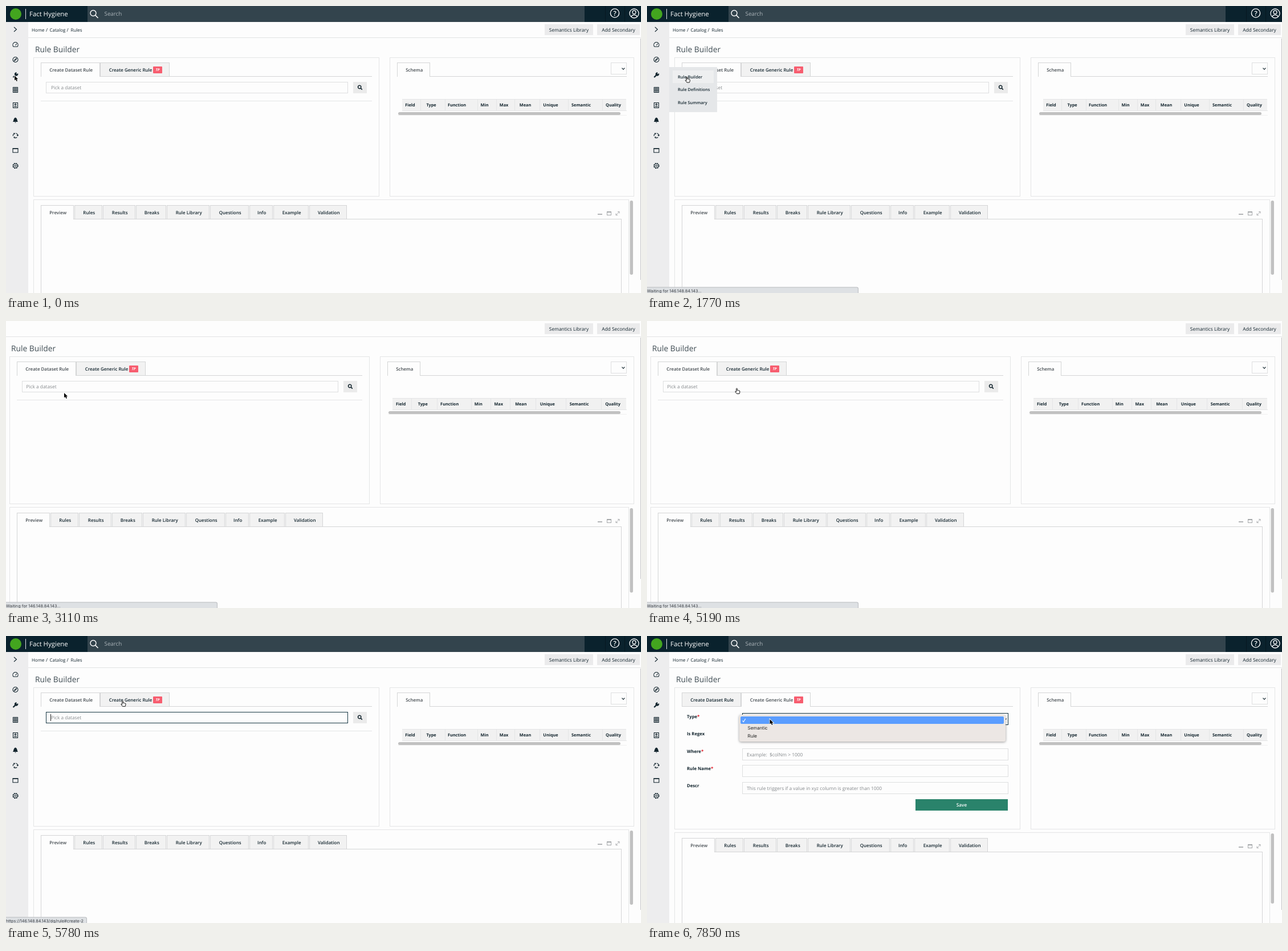
Animation of 1114 by 503 pixels, one loop 8 s. Source, as an HTML page with a canvas:

```html
<!DOCTYPE html>
<html lang="en">
<head>
<meta charset="utf-8">
<title>Rule Builder</title>
<style>
html, body { margin: 0; width: 100%; height: 100%; overflow: hidden; background: #fdfdfd; }
canvas { display: block; width: 1114px; height: 503px; }
</style>
</head>
<body>
<canvas id="stage"></canvas>
<script>
const W = 1114, H = 503, LOOP = 8000, STEP = 148.1;
const canvas = document.getElementById('stage');
const c = canvas.getContext('2d');
const ratio = window.devicePixelRatio || 1;
canvas.width = W * ratio;
canvas.height = H * ratio;
c.textRendering = 'geometricPrecision';

const SANS = '"Open Sans", "Noto Sans", sans-serif';
const UI = 'Inter, "Liberation Sans", sans-serif';
const INK = '#13252e', GREY = '#444b50', HINT = '#85898c', EDGE = '#d4d5d6', PALE = '#e4e5e6';
const FIELD = '#dedfe0', FOCUS = '#173743';
const PAGE = '#fdfdfd', TAB = '#f2f2f2', HEADER = '#0a222d', RED = '#e0202c';

const TABS = [['Preview', 61, 119], ['Rules', 120, 169], ['Results', 170, 227],
  ['Breaks', 228, 281], ['Rule Library', 282, 357], ['Questions', 358, 426],
  ['Info', 427, 468], ['Example', 469, 531], ['Validation', 532, 598]];
const COLUMNS = [['Field', 709, 727], ['Type', 746, 770], ['Function', 791, 827],
  ['Min', 839.5, 860], ['Max', 873.5, 892], ['Mean', 911, 936],
  ['Unique', 955.5, 986], ['Semantic', 1009, 1046], ['Quality', 1065.5, 1088]];

// Pointer keys: step, x, y
const KEYS = [[3, 15, 122], [9, 70, 124], [13, 70, 124], [16, 98, 125], [20, 98, 125],
  [21, 102, 126], [25, 154, 118], [32, 154, 118], [35, 157.5, 117.5], [36, 161.5, 117.5],
  [40, 219, 112], [46, 219, 112], [50, 215.5, 146]];

// Sidebar icons, drawn around (0, 0)
const ICONS = {
  41: 'M-2.5-4L2 0L-2.5 4',
  68: 'M-3.5 3.2A4.6 4.6 0 1 1 3.5 3.2ZM0 1L2.3-2',
  94: 'M4.5 0A4.5 4.5 0 1 1-4.5 0A4.5 4.5 0 1 1 4.5 0M2-2L.7 .7L-2 2L-.7-.7Z',
  147: 'M-4-4.5H4V4.5H-4ZM-4-1.5H4M-4 1.5H4M-1.3-4.5V4.5M1.3-4.5V4.5',
  174: 'M-4-4.5H4V4.5H-4ZM1.3-1.3A1.3 1.3 0 1 1-1.3-1.3A1.3 1.3 0 1 1 1.3-1.3M-2.4 2.4H2.4',
  227: 'M-4 1A4 4 0 0 1-1.8-3.6M.5-4A4 4 0 0 1 4 0M2.8 2.8A4 4 0 0 1-2.2 3.4M-3.2-4L-1.2-3.8L-1.8-1.8M2.5-1.2L4 .6L5.2-1.2M-1 1.9L-2.6 3.4L-1 4.6',
  253: 'M-4.5-3.5H4.5V3.8H-4.5ZM-4.5-2.7H4.5'
};

function text(str, x, y, size, color = INK, weight = 400, align = 'left', family = SANS) {
  c.font = `${weight} ${size}px ${family}`;
  c.textAlign = align;
  c.fillStyle = color;
  c.fillText(str, x, y + size * 0.357);
}

function fill(x, y, w, h, color, radius = 0) {
  c.fillStyle = color;
  c.beginPath();
  c.roundRect(x, y, w, h, radius);
  c.fill();
}

function box(x0, y0, x1, y1, edge = EDGE, back) {
  if (back) fill(x0, y0, x1 - x0, y1 - y0, back);
  c.strokeStyle = edge;
  c.lineWidth = 1;
  c.strokeRect(x0 + 0.5, y0 + 0.5, x1 - x0 - 1, y1 - y0 - 1);
}

const rule = (x0, x1, y, color = EDGE) => fill(x0, y, x1 - x0, 1, color);

function path(d, x, y, stroke, width = 1, back) {
  const p = new Path2D(d);
  c.save();
  c.translate(x, y);
  if (back) { c.fillStyle = back; c.fill(p); }
  if (stroke) { c.strokeStyle = stroke; c.lineWidth = width; c.stroke(p); }
  c.restore();
}

function circle(x, y, r, stroke, width, back) {
  path(`M${r} 0A${r} ${r} 0 1 1 ${-r} 0A${r} ${r} 0 1 1 ${r} 0`, x, y, stroke, width, back);
}

function lens(x, y, r, color, width) {
  circle(x, y, r, color, width);
  path(`M0 0L${r} ${r}`, x + r * 0.7, y + r * 0.7, color, width * 1.1);
}

const chevron = (x, y) => path('M-2.5-1.3L0 1.2L2.5-1.3', x, y, INK, 1.2);

function tab(label, x0, x1, y0, y1, active, textX) {
  box(x0, y0, x1, y1 + 1, EDGE, active ? PAGE : TAB);
  if (active) fill(x0 + 1, y1, x1 - x0 - 2, 1, PAGE);
  const color = active === 'hover' || !active ? INK : GREY;
  const mid = (y0 + y1) / 2 + 0.7;
  if (textX) text(label, textX, mid, 7.95, color, 600);
  else text(label, (x0 + x1) / 2 + 1.2, mid, 7.95, color, 600, 'center');
}

function header(full) {
  fill(0, 0, W, 28, HEADER);
  circle(17, 14, 10, null, 0, '#43a51f');
  fill(34, 5, 1, 18, '#dfe4e6');
  text('Fact Hygiene', 41, 14, 11.4, '#fff');
  if (full) {
    fill(143, 0, 872, 28, '#33444d');
    lens(153, 12.5, 5, '#fff', 1.4);
    text('Search', 172.5, 14, 9.8, '#aab3b8');
  }
  fill(1051, 0, 1, 28, '#061820');
  fill(1085, 0, 1, 28, '#061820');
  circle(1068, 12.5, 7.6, '#fff', 1.4);
  text('?', 1068, 12.7, 11.5, '#fff', 600, 'center');
  circle(1102, 13, 8, '#fff', 1.3);
  circle(1102, 10.8, 3, '#fff', 1.3);
  path('M-5.2 0C-4-4.5 4-4.5 5.2 0', 1102, 19, '#fff', 1.3);
}

function sidebar() {
  fill(0, 28, 39, H - 28, '#ededee');
  for (const y in ICONS) path(ICONS[y], 16.5, +y, INK, 1.1);
  path('M-4 4L1-1', 16.5, 121, INK, 2.3);
  path('M4.4-2.6A3 3 0 1 1 1.8-4.6L1.5-2L2.2-1.5Z', 16.5, 121, INK, 0.5, INK);
  path('M-4.6 3C-3 1.5-3.3-3.8 0-4.6C3.3-3.8 3 1.5 4.6 3ZM-1.4 3.7H1.4L0 5Z', 16.5, 200, null, 0, INK);
  c.setLineDash([2, 1.6]);
  circle(16.5, 280, 4.5, INK, 1.3);
  c.setLineDash([]);
  circle(16.5, 280, 3.8, INK, 1);
  circle(16.5, 280, 1.5, INK, 1);
}

function datasetForm(left, right, focused) {
  box(70 + left, 133, 600 + right, 153, focused ? FOCUS : FIELD, PAGE);
  text('Pick a dataset', 79 + left - (left ? 1.5 : 0), 143.3, 8.3, HINT);
  if (focused) fill(78 + left, 137, 1, 12, '#222');
  fill(609 + right, 133, 24, 20, '#ebebeb');
  lens(620.2 + right, 142, 2.7, INK, 1.5);
  rule(61 + left, 642 + right, 166, PALE);
}

function label(str, y, required) {
  text(str, 70, y, 7.7, INK, 700);
  if (required) text('*', 70 + c.measureText(str).width, y, 8, RED, 700);
}

function genericForm(focused) {
  label('Type', 141.5, true);
  label('Is Regex', 171);
  label('Where', 202.3, true);
  label('Rule Name', 232.3, true);
  label('Descr', 262);
  box(167, 135, 634, 156, focused ? FOCUS : FIELD, PAGE);
  chevron(628, 146);
  box(173, 171, 185, 183, '#444', '#fff');
  for (const y of [197, 226, 256]) box(167, y, 634, y + 21, FIELD, PAGE);
  text('Example:  $colNm > 1000', 175, 207.6, 8.4, HINT);
  text('This rule triggers if a value in xyz column is greater than 1000', 175, 266.8, 8.35, HINT);
  fill(471, 286, 162, 20, '#2a836b');
  text('Save', 552, 296, 8.2, '#fff', 600, 'center');
}

function schema(right) {
  const x = 686 + right;
  const at = v => 1088 - (1088 - v) * (393 - right) / 393;
  rule(x, 1089, 123);
  tab('Schema', x, 744 + right, 99, 123, true);
  box(1061, 99, 1089, 120, FIELD, PAGE);
  chevron(1083, 110);
  fill(at(695), 163, 1088 - at(695), 21, '#f1f1f1');
  rule(at(695), 1088, 163, PALE);
  for (const [name, mid, end] of COLUMNS) {
    text(name, at(mid), 173.3, 7.3, INK, 700, 'center');
    if (end < 1088) fill(Math.round(at(end)), 163, 1, 21, '#e4e5e6');
  }
  rule(at(695), 1089, 183, PALE);
  fill(x + 2, 186, 1078 - x - 2, 5, '#c1c1c1', 2.5);
  rule(x + 2, 1089, 191, '#f0f0f0');
}

// mid: vertical shift of the lower panel; low: lower end of its scroll thumb
function results(left, mid, low) {
  box(48 + left, 339 + mid, 1093, 540 + mid, PALE);
  box(61 + left, 373 + mid, 1080, 560 + mid, EDGE);
  TABS.forEach(([name, a, b], i) => tab(name, a + left, b + left, 349 + mid, 373 + mid, i === 0));
  fill(1038, 364 + mid, 8, 2, '#b3b5b7');
  box(1054, 360 + mid, 1062, 367 + mid, '#a5a8aa');
  fill(1054, 360 + mid, 8, 2, '#a5a8aa');
  path('M-3 3L3-3M0-3H3V0M-3 0V3H0', 1073, 363.5 + mid, '#a5a8aa', 0.9);
  fill(1094.5, 341 + mid, 5.5, low - 341 - mid, '#c1c1c1', 2.7);
}

function page(v) {
  const { left, right, up, generic } = v;
  c.save();
  c.translate(0, up);
  if (!up) {
    header(v.full);
    ['Home', 'Catalog', 'Rules'].forEach((s, i) => text(s, [45, 76.5, 113.5][i] + left, 42, 7.95));
    text('/', 70 + left, 42, 8.5);
    text('/', 106.5 + left, 42, 8.5);
  }
  rule(v.full ? 39 : 0, W, 55, '#e2e3e4');
  fill(945, 32, 85, 19, '#ebebec');
  fill(1037, 32, 75, 19, '#ebebec');
  text('Semantics Library', 987.5, 41.7, 8.4, INK, 400, 'center');
  text('Add Secondary', 1074.5, 41.7, 8.4, INK, 400, 'center');
  text('Rule Builder', 51 + left, 76, 13.8, '#3f4c53');

  const bottom = 334 + v.mid - up;
  box(48 + left, 90, 655 + right, bottom, PALE);
  box(673 + right, 90, 1102, bottom, PALE);
  rule(61 + left, 642 + right, 123);
  tab('Create Dataset Rule', 61 + left, 165 + left, 99, 123, !generic, 76.3 + left);
  tab('Create Generic Rule', 165 + left, 287 + left, 99, 123, generic && (v.hover ? 'hover' : true), 180.7 + left);
  fill(258 + left, 106, 16, 12, '#f75d6f', 1);
  text('TP', 266 + left, 112.2, 6.4, '#fff', 'italic 700', 'center');
  if (generic) genericForm(v.open); else datasetForm(left, right, v.focused);
  schema(right);
  c.restore();

  results(left, v.mid, v.low);
  fill(1113, 57 + up, 1, 423, '#c4c5c6');
  if (v.full) sidebar();
}

function menu(hover) {
  fill(39, 107, 84, 79, '#e5e7e9');
  if (hover) fill(45, 113, 72, 22, '#eeeff0');
  ['Rule Builder', 'Rule Definitions', 'Rule Summary'].forEach((s, i) =>
    text(s, 54, 124.5 + 22.3 * i, 7.35, INK, 600));
}

function popup() {
  c.save();
  c.shadowColor = 'rgba(0,0,0,.4)';
  c.shadowBlur = 4;
  c.shadowOffsetY = 1;
  fill(162, 138, 467, 47, '#ece7e4', 3);
  c.restore();
  fill(164, 141, 462, 13, '#5a9dff', 2);
  path('M-2.5 .3L-.7 2.5L2.7-3', 170, 148, '#fff', 1.1);
  text('Semantic', 176.5, 161.5, 8, '#222', 400, 'left', UI);
  text('Rule', 176.5, 175.5, 8, '#222', 400, 'left', UI);
}

function status(str, width) {
  fill(-2, 492.5, width + 2, 14, '#b9bcbf', 3);
  fill(-2, 493.5, width + 1, 14, '#dee1e4', 2);
  text(str, 0, 499, 7.3, '#3a3f44', 400, 'left', UI);
}

function pointer(s) {
  let i = KEYS.findIndex(k => k[0] > s);
  if (i < 0) i = KEYS.length;
  const a = KEYS[Math.max(i - 1, 0)], b = KEYS[Math.min(i, KEYS.length - 1)];
  const p = b[0] > a[0] ? Math.max(0, (s - a[0]) / (b[0] - a[0])) : 0;
  const x = a[1] + (b[1] - a[1]) * p, y = a[2] + (b[2] - a[2]) * p;
  const kind = s < 8 ? 'arrow' : s < 15 ? 'hand' : s < 23 ? 'arrow' : s < 33 ? 'beam' : s < 45 ? 'hand' : 'arrow';
  if (kind === 'arrow') {
    const shape = 'M0 0V8.6L2 6.8L3.5 10L5 9.3L3.6 6.2H6.2Z';
    path(shape, x, y, '#fff', 1.6);
    path(shape, x, y, null, 0, '#000');
  } else if (kind === 'beam') {
    path('M-1.7-5Q0-5 0-4V4Q0 5-1.7 5M1.7-5Q0-5 0-4M0 4Q0 5 1.7 5', x, y, '#333', 0.9);
  } else {
    path('M-.8 1Q0-.6 .8 1V4Q1.5 3.3 2.3 4.2Q3.2 3.7 3.8 4.6Q5.2 4.2 5.3 5.6V7.5L4.5 10H0L-2.8 6.4Q-2.6 5-.8 6.5Z',
      x, y, '#111', 1, '#fff');
  }
}

function draw(now) {
  const s = Math.floor((now % LOOP + 10) / STEP);
  const bare = s >= 14 && s < 36;
  const full = s < 14 || s >= 37;
  const generic = s >= 43;
  const open = s >= 50;

  c.setTransform(ratio, 0, 0, ratio, 0, 0);
  fill(0, 0, W, H, PAGE);
  page({
    full, generic, open,
    left: full ? 0 : -42,
    right: full ? 0 : -17,
    up: bare ? -28 : 0,
    mid: bare ? -13 : generic ? 5 : 0,
    low: bare ? 476 : generic ? 469 : 471,
    focused: s >= 36 && !generic,
    hover: s < 48
  });
  if (s >= 4 && s < 14) menu(s >= 8);
  if (open) popup();
  if (s >= 10 && s < 36) status('Waiting for 146.148.84.143...', 371);
  else if (s >= 36 && s < 48) status('https://146.148.84.143/dq/rule#create-2', 142);
  pointer(s);
}

const start = performance.now();
function tick() {
  draw(performance.now() - start);
  requestAnimationFrame(tick);
}
tick();
</script>
</body>
</html>
```
